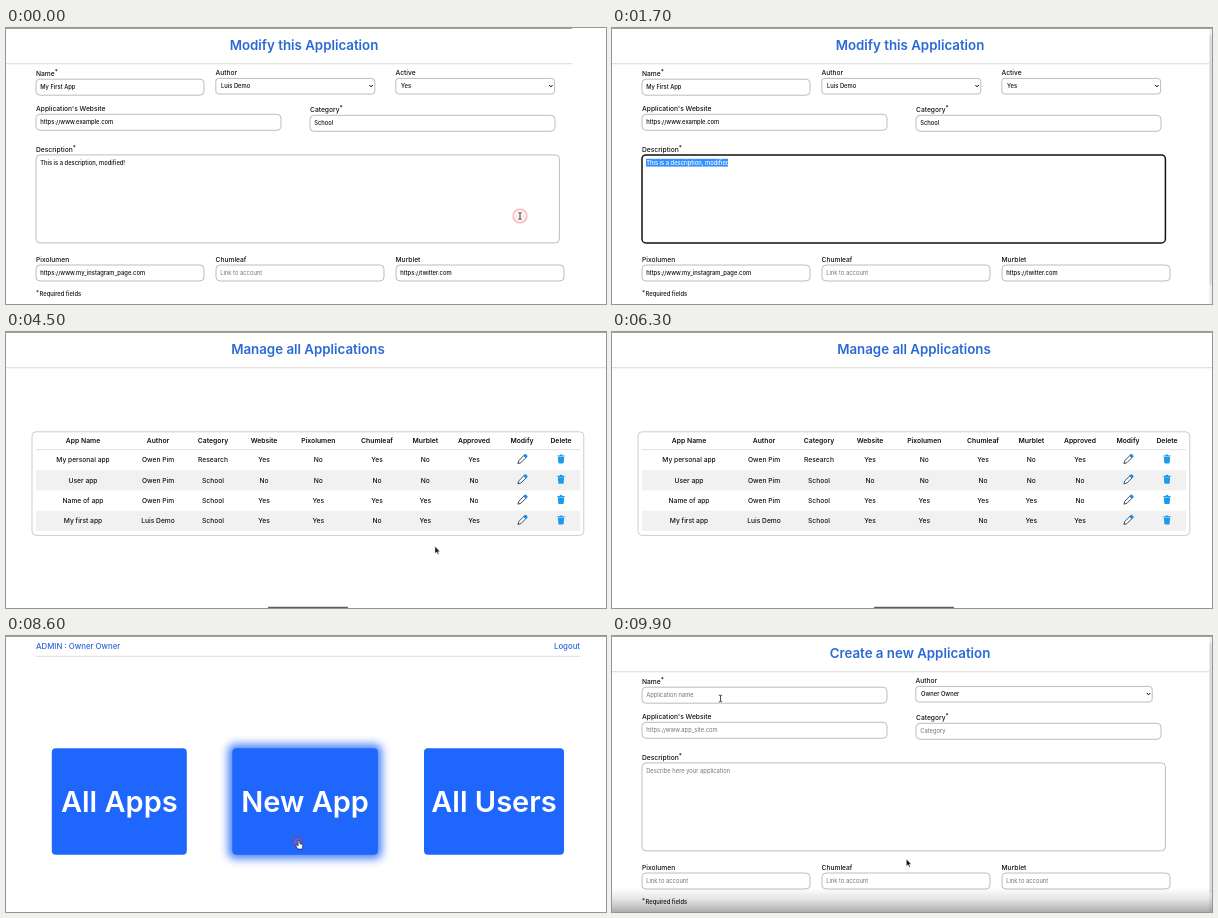
Recreate the animation shown at these times as an HTML page. Size 600 by 276 pixels, loop 10 s.

```html
<!DOCTYPE html>
<html lang="en">
<head>
<meta charset="utf-8">
<title>Application manager</title>
<style>
html, body { margin: 0; width: 100%; height: 100%; overflow: hidden; background: #fff; }
svg { display: block; width: 100vw; height: 100vh; }
text { font-family: Inter, "Open Sans", sans-serif; fill: #111; white-space: pre; }
.title { font-size: 13.3px; font-weight: 600; fill: #2a6ad6; text-anchor: middle; }
.label { font-size: 6.7px; font-weight: 500; }
.value { font-size: 5.8px; font-weight: 500; }
.hint { font-size: 5.8px; fill: #757575; }
.head { font-size: 6.8px; font-weight: 600; text-anchor: middle; }
.cell { font-size: 6.7px; font-weight: 500; text-anchor: middle; }
.link { font-size: 7.8px; font-weight: 500; fill: #2a68d8; }
.tile { font-size: 29px; font-weight: 600; fill: #fff; text-anchor: middle; }
.box { fill: #fff; stroke: #adadad; stroke-width: .8; }
</style>
</head>
<body>
<svg id="stage" viewBox="0 0 600 276" preserveAspectRatio="none"></svg>
<script>
const LOOP = 10000, STEP = 100;
const BLUE = '#1e66fc';
const AUTHOR = 'Luis Demo', OTHER = 'Owen Pim', OWNER = 'Owner Owner';
const SOCIALS = ['Pixolumen', 'Chumleaf', 'Murblet'];
const stage = document.getElementById('stage');

function add(parent, tag, attrs = {}, content) {
  const el = document.createElementNS('http://www.w3.org/2000/svg', tag);
  for (const key in attrs) el.setAttribute(key, attrs[key]);
  if (content !== undefined) el.textContent = content;
  parent.appendChild(el);
  return el;
}
const group = (parent = stage) => add(parent, 'g');
const text = (g, cls, x, y, content) => add(g, 'text', { class: cls, x, y }, content);
const rect = (g, x, y, width, height, fill, rx = 0) =>
  add(g, 'rect', { x, y, width, height, fill, rx });
const path = (g, d, attrs) => add(g, 'path', { d, ...attrs });
const show = (el, on) => el.setAttribute('visibility', on ? 'inherit' : 'hidden');

function box(g, x, y, width, height) {
  return add(g, 'rect', { class: 'box', x, y, width, height, rx: 4 });
}

function label(g, x, y, name, required) {
  const el = text(g, 'label', x, y, name);
  if (required) add(el, 'tspan', { dy: -2, 'font-size': 6 }, '*');
}

function input(g, x, y, width, content, filled) {
  box(g, x, y, width, 16);
  text(g, filled ? 'value' : 'hint', x + 4.2, y + 10.1, content);
}

function select(g, x, y, width, content) {
  add(g, 'rect', { class: 'box', x, y, width, height: 15.6, rx: 3 });
  text(g, 'value', x + 5.2, y + 9.9, content);
  const end = x + width;
  path(g, `M${end - 5.4} ${y + 6.6}l1.7 1.9l1.7 -1.9`,
    { fill: 'none', stroke: '#111', 'stroke-width': 1 });
}

function banner(g, title, x) {
  rect(g, 0, 35.4, 600, .8, '#cfcfcf');
  text(g, 'title', x, 22.2, title);
}

// Parts common to the editing and the creating form
function formPage(title, description, links) {
  const g = group();
  banner(g, title, 298);
  label(g, 30, 48, 'Name', true);
  label(g, 30, 83, "Application's Website");
  label(g, 304, 84.2, 'Category', true);
  label(g, 30, 124, 'Description', true);
  const area = box(g, 30, 126.9, 523.4, 88);
  const filled = links.some(Boolean);
  const mark = rect(g, 34, 130.8, 0, 7.8, '#3390ff');
  const body = text(g, filled ? 'value' : 'hint', 34.2, 136.7, description);
  SOCIALS.forEach((name, i) => {
    const x = 30 + i * 180;
    label(g, x - (i ? .5 : 0), 233.8, name);
    input(g, x, 237, 168, links[i] || 'Link to account', links[i]);
  });
  const note = text(g, 'value', 30, 268.2, '*');
  note.setAttribute('dy', -1.2);
  text(g, 'value', 33.6, 268.2, 'Required fields');
  rect(g, 597.2, 1, 2.8, 275, '#f0f0f0');
  rect(g, 597.7, 7, 1.9, 250, '#d6d6d6', 1);
  return { g, area, mark, body };
}

function editPage() {
  const page = formPage('Modify this Application', 'This is a description, modified!',
    ['https://www.my_instagram_page.com', '', 'https://twitter.com']);
  const { g } = page;
  input(g, 30, 51.2, 168, 'My First App', true);
  label(g, 209.5, 47, 'Author');
  select(g, 209.8, 50.4, 159, AUTHOR);
  label(g, 389.5, 47, 'Active');
  select(g, 389.8, 50.4, 158.8, 'Yes');
  input(g, 30, 86.3, 245, 'https://www.example.com', true);
  input(g, 304, 87.3, 245, 'School', true);
  return page;
}

function createPage() {
  const { g } = formPage('Create a new Application', 'Describe here your application', []);
  input(g, 30, 51.2, 245, 'Application name');
  label(g, 303.5, 47, 'Author');
  select(g, 303.8, 50.4, 236.4, OWNER);
  input(g, 30, 86.3, 245, 'https://www.app_site.com');
  input(g, 304, 87.3, 245, 'Category');
  return g;
}

function pencil(g, x, y) {
  const p = add(g, 'g', { transform: `translate(${x} ${y}) rotate(45)` });
  path(p, 'M-1.5 -3.6V3.4L0 6.2L1.5 3.4V-3.6Z',
    { fill: '#fff', stroke: '#33465c', 'stroke-width': .9, 'stroke-linejoin': 'round' });
  path(p, 'M-1.9 -3.3V-5.2Q-1.9 -6.2 -.9 -6.2H.9Q1.9 -6.2 1.9 -5.2V-3.3Z', { fill: '#1d8be8' });
}

function bin(g, x, y) {
  path(g, `M${x - 3.6} ${y - 3.6}h2.1l.5 -.9h2l.5 .9h2.1v1.2h-7.2z`, { fill: '#189bee' });
  path(g, `M${x - 3.1} ${y - 2}h6.2l-.4 5.6q-.1 .9 -1 .9h-3.4q-.9 0 -1 -.9z`, { fill: '#189bee' });
}

function tablePage() {
  const g = group();
  const columns = [77, 152, 207, 258, 312.3, 371, 419.3, 468, 516, 555];
  const heads = ['App Name', 'Author', 'Category', 'Website', SOCIALS[0], SOCIALS[1],
    SOCIALS[2], 'Approved', 'Modify', 'Delete'];
  const rows = [
    ['My personal app', OTHER, 'Research', 'YNYNY'],
    ['User app', OTHER, 'School', 'NNNNN'],
    ['Name of app', OTHER, 'School', 'YYYYN'],
    ['My first app', AUTHOR, 'School', 'YYNYY'],
  ];
  banner(g, 'Manage all Applications', 302);
  add(g, 'rect', { x: 26, y: 99.8, width: 551.8, height: 103.6, rx: 4,
    fill: '#fff', stroke: '#c8c8c8', 'stroke-width': .9 });
  heads.forEach((head, i) => text(g, 'head', columns[i], 110.8, head));
  rect(g, 30, 117.4, 544, .7, '#d4d4d4');
  rows.forEach(([name, author, category, flags], r) => {
    const y = 128 + r * 20.3;
    if (r % 2) rect(g, 30, y - 10.2, 544, 20.3, '#f1f1f1');
    const answers = [...flags].map(f => f === 'Y' ? 'Yes' : 'No');
    [name, author, category, ...answers].forEach((cell, i) =>
      text(g, 'cell', columns[i], y + 2.4, cell));
    pencil(g, 516.3, y - .8);
    bin(g, 555, y - 1);
  });
  rect(g, 262, 274.8, 80, 1.2, '#5c5c5c', .6);
  return g;
}

function homePage() {
  const g = group();
  text(g, 'link', 30, 13.2, 'ADMIN : ' + OWNER);
  text(g, 'link', 574, 13.2, 'Logout').setAttribute('text-anchor', 'end');
  rect(g, 30, 19.8, 544, .8, '#d5d5d5');
  const glow = rect(g, 222, 108, 154, 115, '#2f6ff5', 7);
  glow.setAttribute('filter', 'url(#blur)');
  [[45.8, 135, 'All Apps'], [226.3, 145.6, 'New App'], [418, 140, 'All Users']]
    .forEach(([x, width, name]) => {
      rect(g, x, 112.2, width, 106.6, BLUE, 4);
      text(g, 'tile', x + width / 2, 176.2, name);
    });
  return { g, glow };
}

const defs = add(stage, 'defs');
const blur = add(defs, 'filter', { id: 'blur', x: '-20%', y: '-25%', width: '140%', height: '150%' });
add(blur, 'feGaussianBlur', { stdDeviation: 4.5 });
const shade = add(defs, 'linearGradient', { id: 'shade', x1: 0, y1: 0, x2: 0, y2: 1 });
[[0, 0], [.45, .1], [1, .32]].forEach(([offset, opacity]) =>
  add(shade, 'stop', { offset, 'stop-color': '#000', 'stop-opacity': opacity }));

rect(stage, 0, 0, 600, 276, '#fff');
const edit = editPage(), table = tablePage(), home = homePage(), create = createPage();
rect(stage, 0, 0, 600, 1, '#a2a2a2');
const margin = rect(stage, 566, 0, 34, 276, '#fff');
const dim = rect(stage, 0, 252, 600, 24, 'url(#shade)');

const ARROW = 'M0 0V7.2L1.7 5.7L2.8 8.2L4 7.7L2.9 5.3H5.1Z';
const arrowStyle = { fill: '#111', stroke: '#fff', 'stroke-width': .5 };
const rest = path(stage, ARROW, { ...arrowStyle, transform: 'translate(294.3 223)' });
const ring = add(stage, 'circle', { fill: '#f88', 'fill-opacity': .15, 'stroke-width': 1.1 });
const pointer = group();
const shapes = {
  beam: path(pointer, 'M-1.6 -3.4Q0 -3.4 0 -2.4Q0 -3.4 1.6 -3.4M0 -2.6V2.6M-1.6 3.4Q0 3.4 0 2.4Q0 3.4 1.6 3.4',
    { fill: 'none', stroke: '#222', 'stroke-width': .8 }),
  arrow: path(pointer, ARROW, arrowStyle),
  hand: path(pointer, 'M-.9 -3.6Q0 -4.6 .8 -3.6V-.8L3.2 -.2Q4 .1 3.8 1.2L3.2 4.6H-1L-3.2 1.4Q-3.2 .2 -2 .5L-.9 1.4Z',
    { fill: '#fff', stroke: '#111', 'stroke-width': .6, 'stroke-linejoin': 'round' }),
};

// Each leg of the pointer: shape, then [time, x, y] stops
const legs = [
  ['beam', [0, 514, 188], [100, 514, 188], [1100, 400, 160], [1300, 117, 135], [1600, 34, 135]],
  ['beam', [2000, 120, 150], [2600, 350, 232]],
  ['arrow', [2700, 368, 242], [2900, 379.5, 248.5], [3000, 379.5, 248.5], [3400, 392, 226],
    [3600, 392, 226], [4600, 430, 214], [5400, 400, 274]],
  ['arrow', [8100, 325, 268], [8200, 318, 245]],
  ['hand', [8300, 306, 216], [8500, 293, 208.5], [8800, 293, 208.5]],
  ['arrow', [8900, 293, 210], [9100, 294.3, 223]],
  ['beam', [9200, 270, 205], [9800, 108.5, 62.5], [9900, 108.5, 62.5]],
];
// Start, end, radius, offset of centre, colour
const clicks = [
  [0, 100, 7, 0, 0, '#f0a9a9'],
  [2900, 3100, 4, -.5, 0, '#d84a4a'],
  [8500, 8700, 4.6, -1.6, -3, '#8d3c78'],
];

const clamp = v => Math.max(0, Math.min(1, v));
const ramp = (t, from, to) => clamp((t - from) / (to - from));
const ease = p => p * p * (3 - 2 * p);

function locate(t) {
  for (const [shape, ...stops] of legs) {
    if (t < stops[0][0] || t > stops[stops.length - 1][0]) continue;
    const i = Math.max(1, stops.findIndex(s => s[0] >= t));
    const [a, b] = [stops[i - 1], stops[i]];
    const p = ease(ramp(t, a[0], b[0]));
    return { shape, x: a[1] + (b[1] - a[1]) * p, y: a[2] + (b[2] - a[2]) * p };
  }
  return null;
}

function drawPointer(t) {
  const at = locate(t);
  show(pointer, at);
  const click = at && clicks.find(c => t >= c[0] && t < c[1]);
  show(ring, click);
  if (!at) return;
  pointer.setAttribute('transform', `translate(${at.x} ${at.y})`);
  for (const name in shapes) show(shapes[name], name === at.shape && at);
  for (const name in shapes) shapes[name].style.display = name === at.shape ? '' : 'none';
  if (!click) return;
  const [, , r, dx, dy, stroke] = click;
  Object.entries({ cx: at.x + dx, cy: at.y + dy, r, stroke })
    .forEach(([key, value]) => ring.setAttribute(key, value));
}

function draw(t) {
  show(edit.g, t < 2800);
  show(table, t >= 2800 && t < 7000);
  show(home.g, t >= 7000 && t < 8900);
  show(create, t >= 8900);

  const focused = t >= 100;
  edit.area.style.stroke = focused ? '#111' : '';
  edit.area.style.strokeWidth = focused ? 1.5 : '';
  const picked = ramp(t, 1300, 1600);
  edit.mark.setAttribute('x', 34 + 82 * (1 - picked));
  edit.mark.setAttribute('width', 82 * picked);
  edit.body.style.fill = picked > .5 ? '#fff' : '';

  home.glow.setAttribute('opacity', .85 * ramp(t, 8200, 8500));
  show(margin, t < 100);
  show(rest, t >= 9200);
  dim.setAttribute('opacity', ramp(t, 9200, 9700));
  drawPointer(t);
}

const start = performance.now();
function tick(now) {
  const t = Math.max(0, now - start) % LOOP;
  draw(Math.floor(t / STEP) * STEP);
  requestAnimationFrame(tick);
}
draw(0);
requestAnimationFrame(tick);
</script>
</body>
</html>
```
